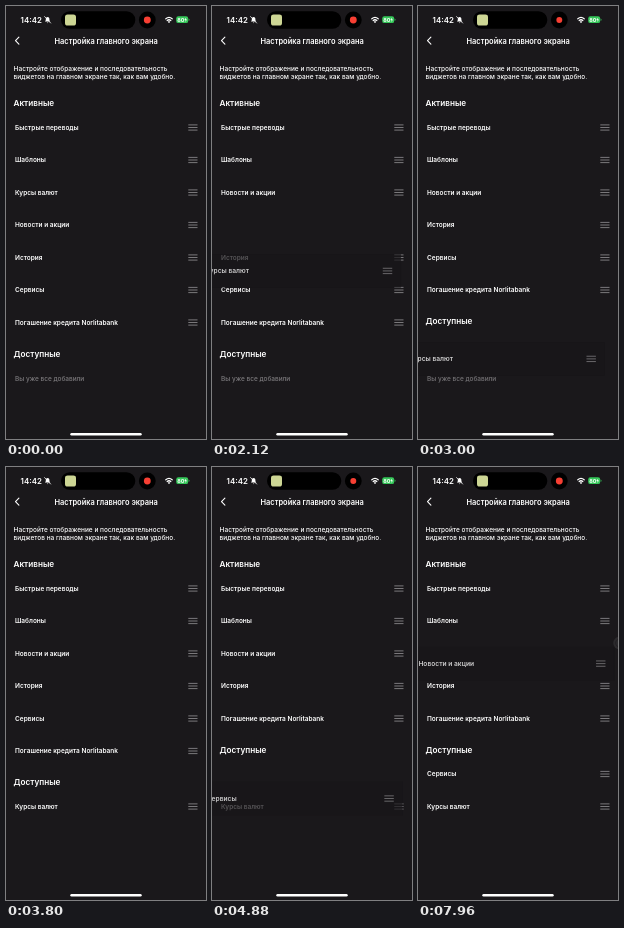
Animation of 200x433 px, one loop 8 s. Source, as an HTML page:

```html
<!DOCTYPE html>
<html lang="ru">
<head>
<meta charset="utf-8">
<style>
html, body { margin: 0; width: 100%; height: 100%; overflow: hidden; background: #1a181b; }
svg { display: block; width: 100vw; height: 100vh; font-family: Inter, Roboto, sans-serif; }
text { fill: #fff; }
.row { font-size: 6.5px; font-weight: 600; }
.head { font-size: 8.2px; font-weight: 600; }
.info { font-size: 6.5px; font-weight: 500; }
.bars { stroke: #8c8a8d; stroke-width: .85; }
.line { fill: none; stroke: #fff; stroke-linecap: round; stroke-linejoin: round; }
</style>
</head>
<body>
<svg viewBox="0 0 200 433">
  <rect width="200" height="433" fill="#1a181b"/>

  <!-- status bar -->
  <text x="14.6" y="16.8" font-size="7.9" font-weight="600">14:42</text>
  <path d="M38.9 15.6h5.4l-.9-1.4v-1.5a1.8 1.8 0 0 0-3.6 0v1.5zM40.8 16.4h1.6l-.8.9z" fill="#fff"/>
  <path d="M38.6 10.6l6 6.4" class="line" stroke-width=".8"/>
  <rect x="55" y="5.2" width="74.3" height="17.5" rx="8.75"/>
  <rect x="59" y="8.5" width="11" height="11" rx="2.6" fill="#cdd694"/>
  <circle cx="141.3" cy="14" r="8.4"/>
  <circle id="rec" cx="141.3" cy="14" r="3.2" fill="#f83f33"/>
  <path d="M159.8 12.8q3.2-2.7 6.4 0M161.2 14.5q1.8-1.5 3.6 0" class="line" stroke-width="1.25"/>
  <circle cx="163" cy="15.9" r=".9" fill="#fff"/>
  <rect x="170.2" y="10.3" width="12" height="6.8" rx="2.2" fill="#35c759"/>
  <path d="M182.7 12.7q.8.1.8 1t-.8 1z" fill="#35c759"/>
  <text x="171.2" y="15.7" font-size="5.4" font-weight="700">80</text>
  <path d="M180.2 11.6l-1.9 2.5h1.3l-.4 1.8 1.9-2.5h-1.3z" fill="#fff"/>

  <!-- page header -->
  <path d="M12.9 31.1l-3.4 3.5 3.4 3.5" class="line" stroke-width="1.1"/>
  <text x="100.2" y="37.9" font-size="7.46" font-weight="600" text-anchor="middle">Настройка главного экрана</text>
  <g class="info">
    <text x="7.6" y="65.1">Настройте отображение и последовательность</text>
    <text x="7.6" y="73.2">виджетов на главном экране так, как вам удобно.</text>
  </g>
  <text x="7.5" y="100" class="head">Активные</text>
  <text id="more" x="7.5" y="2.7" class="head">Доступные</text>
  <text id="empty" x="9" y="374.5" class="info" style="fill:#7c7a7d">Вы уже все добавили</text>

  <g id="list"></g>
  <g id="float">
    <rect y="-16.3" width="200" height="32.6" fill="#19171a" fill-opacity=".95" stroke="#000" stroke-opacity=".08" stroke-width=".6"/>
    <g id="held"></g>
    <g id="badge">
      <circle cx="205" cy="-20" r="6" fill="#d8d7d9"/>
      <circle cx="205" cy="-20" r="3.6" fill="none" stroke="#6d6d70" stroke-width="1"/>
    </g>
  </g>
  <rect x="64.3" y="427" width="71.4" height="2.5" rx="1.25" fill="#fff"/>
</svg>

<script>
const LOOP = 8000, STEP = 32.5, SHIFT = 300;
const $ = id => document.getElementById(id);
const clamp = x => Math.max(0, Math.min(1, x));
const ease = x => (x = clamp(x)) * x * (3 - 2 * x);

// Piecewise linear value at t; keys are [time, value].
function track(t, keys) {
  if (t <= keys[0][0]) return keys[0][1];
  for (let i = 1; i < keys.length; i++) {
    const [a, v] = keys[i - 1], [b, w] = keys[i];
    if (t < b) return v + (w - v) * (t - a) / (b - a);
  }
  return keys[keys.length - 1][1];
}

// A neighbour slides up one slot at each of the given times.
const slideUp = (t, y, starts) =>
  starts.reduce((sum, s) => sum - STEP * ease((t - s) / SHIFT), y);

const content = name =>
  `<text x="9" y="2.3" class="row">${name}</text>` +
  `<path class="bars" d="M182.3-2.6h9.2M182.3 0h9.2M182.3 2.6h9.2"/>`;

const rows = [
  ["Быстрые переводы", []],
  ["Шаблоны", []],
  ["Курсы валют", []],
  ["Новости и акции", [1820]],
  ["История", [2130]],
  ["Сервисы", [2180]],
  ["Погашение кредита Norlitabank", [2310, 4530]]
].map(([name, starts], i) => {
  const el = document.createElementNS("http://www.w3.org/2000/svg", "g");
  el.innerHTML = content(name);
  $("list").append(el);
  return { name, starts, el, y: 121.5 + STEP * i };
});

// path points: [time, dx, y]; the row settles into slot "to" after "drop".
const drags = [
  { row: rows[2], start: 1400, drop: 2920, end: 3400, to: 339.5,
    path: [[1400, 0, 186.5], [1700, -5, 187], [1760, -7, 191.5], [2200, -15, 281],
           [2400, -17, 341], [2680, -17, 354]] },
  { row: rows[5], start: 4120, drop: 4960, end: 5440, to: 307,
    path: [[4120, 0, 251.5], [4420, -4, 252], [4480, -7, 258], [4880, -12, 331.5], [4920, -12, 332]] },
  { row: rows[3], start: 7560, drop: 9000, end: 9400, to: 251.5,
    path: [[7560, 0, 186.5], [7860, -4, 187], [7920, -6, 191.5], [7960, -6.3, 196.5], [8000, -6.6, 201]] }
];

function drawFloat(t, drag) {
  $("float").style.display = drag ? "" : "none";
  if (!drag) return;
  const u = t - drag.start;
  const back = ease((t - drag.drop) / (drag.end - drag.drop));
  const dx = track(t, drag.path.map(p => [p[0], p[1]])) * (1 - back);
  const y = track(t, drag.path.map(p => [p[0], p[2]]));
  const scale = 1 + .025 * ease(u / 280) * (1 - back);
  const alpha = track(u, [[300, 1], [360, .9], [400, .78]]);
  if ($("held").dataset.name !== drag.row.name) {
    $("held").dataset.name = drag.row.name;
    $("held").innerHTML = content(drag.row.name);
  }
  $("float").setAttribute("transform",
    `translate(${100 + dx} ${y + (drag.to - y) * back}) scale(${scale}) translate(-100 0)`);
  $("float").style.opacity = alpha + (1 - alpha) * back;
  $("badge").style.opacity = track(u, [[300, 0], [345, 1], [365, 1], [400, .12], [430, 0]]);
}

function draw(t) {
  const active = drags.find(d => t >= d.start && t < d.end);
  for (const row of rows) {
    const done = drags.find(d => d.row === row && t >= d.end);
    const y = done ? done.to : slideUp(t, row.y, row.starts);
    row.el.setAttribute("transform", `translate(0 ${y})`);
    row.el.style.opacity = active && active.row === row
      ? track(t - active.start, [[360, 1], [395, 0]]) : 1;
  }
  $("more").setAttribute("transform", `translate(0 ${slideUp(t, 347.9, [2480, 4570])})`);
  $("empty").style.opacity = 1 - ease((t - 2960) / 260);
  $("rec").setAttribute("r", 3.2 + .25 * Math.cos(t * 2 * Math.PI / 2000));
  drawFloat(t, active);
}

const began = performance.now();
function frame() {
  draw((performance.now() - began) % LOOP);
  requestAnimationFrame(frame);
}
frame();
</script>
</body>
</html>
```
